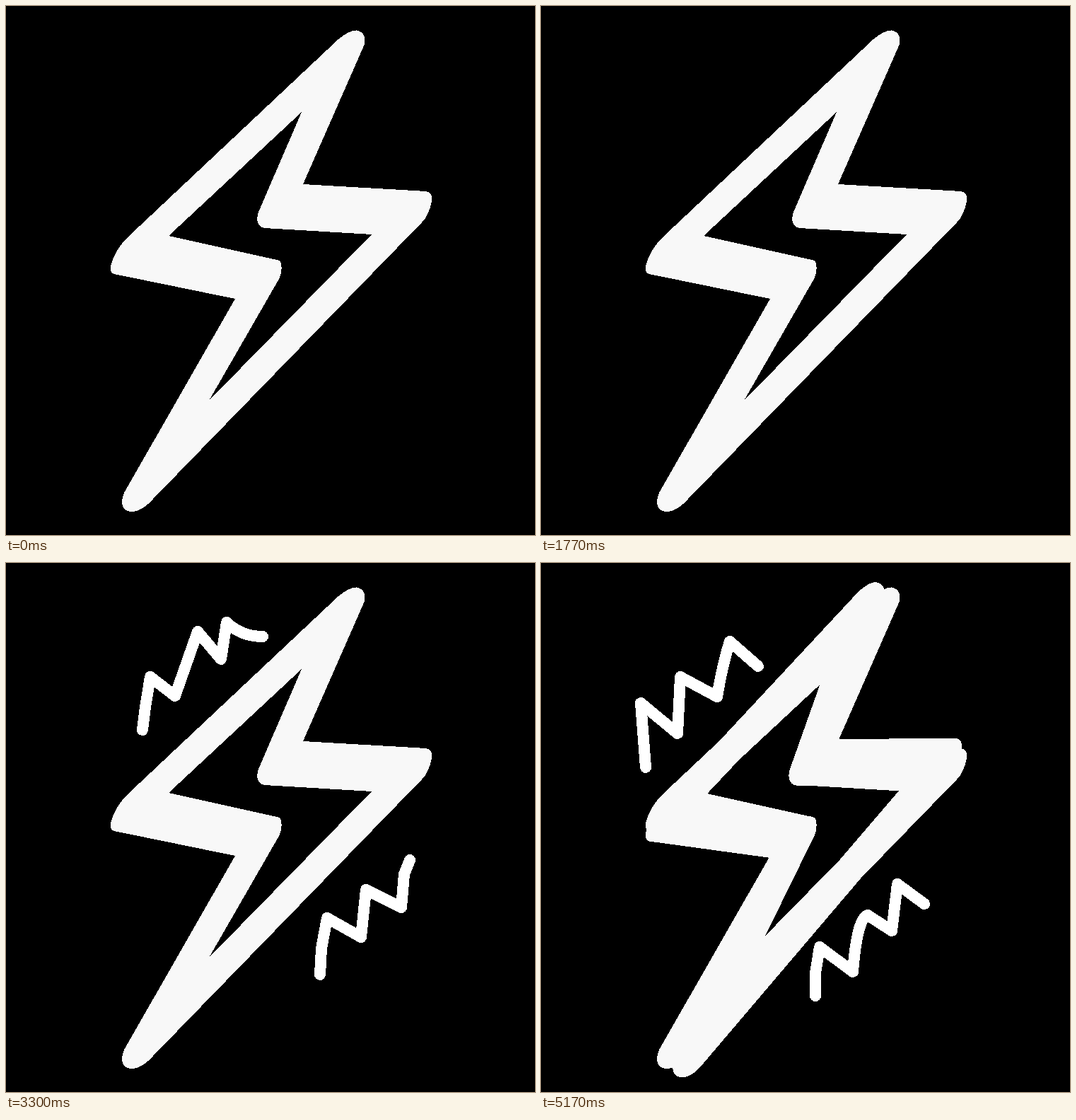
Animation, 748 px wide and 748 px high, one loop 5.21 s. Source, as an HTML page:

```html
<!DOCTYPE html>
<html lang="en">
<head>
<meta charset="utf-8">
<title>Shaking bolt</title>
<style>
  html, body { margin: 0; width: 100%; height: 100%; overflow: hidden; background: #000; }
  svg { display: block; width: 100vw; height: 100vh; shape-rendering: crispEdges; }
  .bolt { fill: #f8f8f8; fill-rule: evenodd; }
  .sparks { fill: none; stroke: #fff; stroke-width: 16; stroke-linecap: round; stroke-linejoin: round; }
  [data-layer] { visibility: hidden; }
</style>
</head>
<body>
<svg viewBox="0 0 748 748">
  <defs>
    <path id="bolt" d="
      M470 47 Q486 34 496 34.500 Q510 38 507 54 L420 252 L594 262
      Q604 264 602 276 Q598 296 588 306 L208 697 Q192 715 177 715
      Q161 714 165 694 Q166 689 170 683 L324 414 L153 379
      Q146 377 148 367 Q154 345 172 327 Z
      M418 150 L358 289 Q352 303 359 311 Q361 313 366 314 L517 323
      L287 558 L386 386 Q391 376 389 364 Q388 360 383 359 L230 325 Z"/>
    <g id="midSparks">
      <path d="M193 236 L197 204 L204 161 L239 188 L271 97 L304 136 L312 84 Q333 104 363 104"/>
      <path d="M444 582 L446 545 L454 502 L502 529 L509 462 L559 487 L563 440 L571 420"/>
    </g>
  </defs>

  <use class="bolt" href="#bolt" data-layer="upright"/>
  <use class="bolt" href="#bolt" data-layer="right" transform="rotate(3.8 374 374)"/>
  <use class="bolt" href="#bolt" data-layer="left" transform="rotate(-3.8 374 374)"/>

  <g class="sparks" data-layer="highSparks">
    <path d="M248 191 L252 159 L259 116 L294 143 L326 52 L359 91 L367 39 Q388 59 418 59"/>
    <path d="M508 537 L510 500 L518 457 L566 484 L573 417 L623 442 L627 395 L635 375"/>
  </g>
  <use class="sparks" href="#midSparks" data-layer="midSparks"/>
  <g class="sparks" data-layer="lowSparks">
    <path d="M148 289 L141 198 L193 241 L197 161 L249 189 Q257 142 267 111 L307 146"/>
    <path d="M388 612 L388 580 L394 543 L441 578 Q447 502 462 498 L496 520 L504 454 L542 482"/>
  </g>
</svg>
<script>
  const LOOP = 5210;
  const SHAKES = 2900;

  // The previous bolt lingers briefly beside the next one.
  const poses = [
    ['upright'],
    ['right', 'highSparks'],
    ['right', 'upright', 'midSparks'],
    ['upright', 'midSparks'],
    ['upright', 'left', 'lowSparks'],
    ['left', 'lowSparks']
  ];

  // Start time of each pose, one row per shake.
  const starts = [
    [0, 200, 370, 400, 530, 570],
    [600, 800, 930, 1000, 1100, 1130],
    [1170, 1370, 1530, 1570, 1700, 1730],
    [1770, 1930, 2100, 2130, 2270, 2300],
    [2330, 2530, 2700, 2730, 2870]
  ];

  const layers = document.querySelectorAll('[data-layer]');

  function poseAt(time) {
    const t = time % LOOP % SHAKES;
    const row = starts.findLast(r => r[0] <= t);
    return poses[row.findLastIndex(start => start <= t)];
  }

  function draw(time) {
    const pose = poseAt(time);
    for (const layer of layers) {
      layer.style.visibility = pose.includes(layer.dataset.layer) ? 'visible' : 'hidden';
    }
  }

  const begin = performance.now();
  function tick() {
    draw(performance.now() - begin);
    requestAnimationFrame(tick);
  }
  tick();
</script>
</body>
</html>
```
